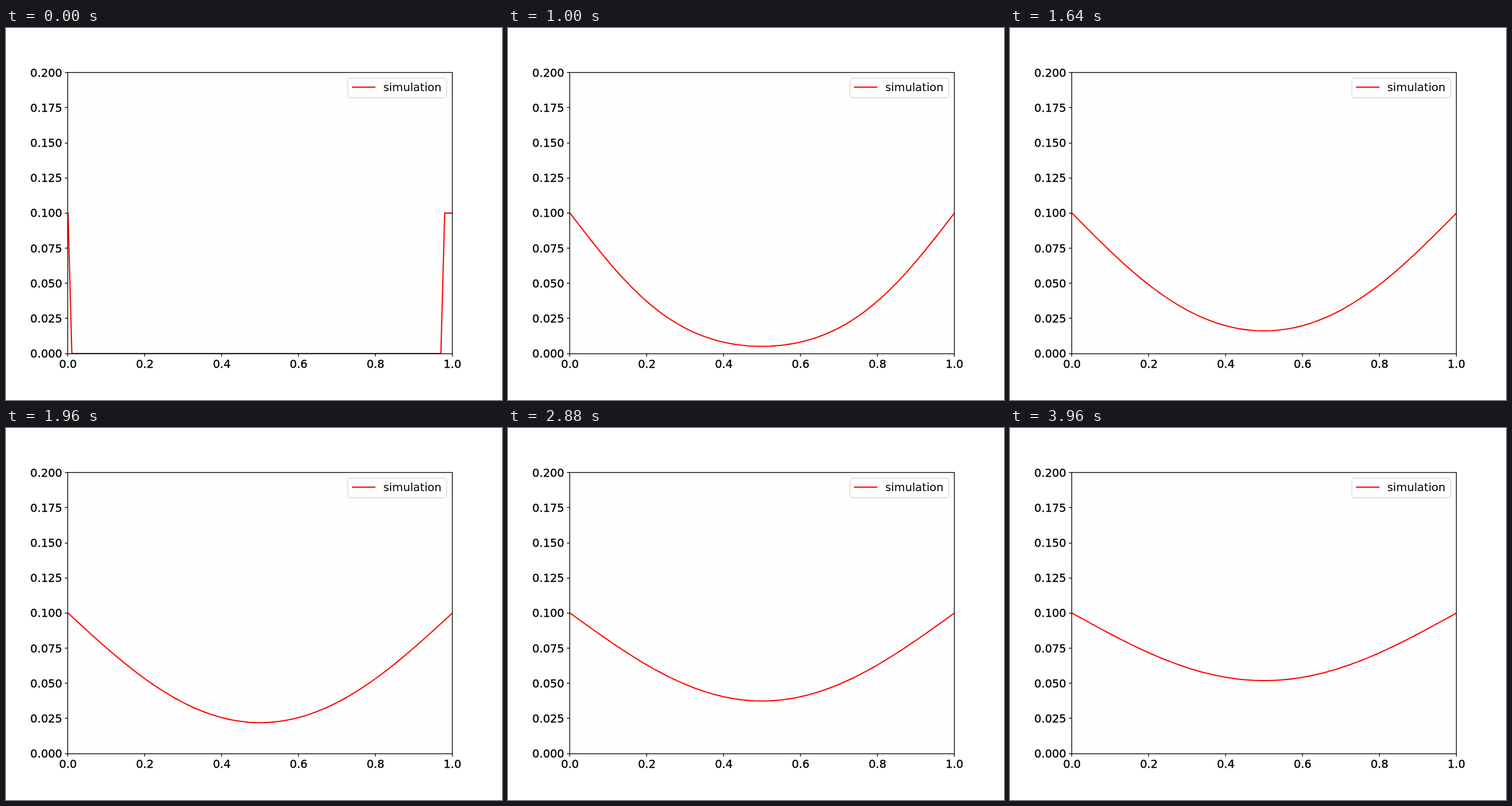
Animation, 864 px wide and 648 px high, one loop 4000 ms. Source, as an HTML page:

```html
<!DOCTYPE html>
<html lang="en">
<head>
<meta charset="utf-8">
<title>Diffusion simulation</title>
<style>
  html, body { margin: 0; width: 100%; height: 100%; overflow: hidden; background: #fff; }
  svg { display: block; width: 864px; height: 648px; }
  text { font: 19.44px "DejaVu Sans", sans-serif; }
  .line { fill: none; stroke: #f00; stroke-width: 2.08; stroke-linejoin: round; stroke-linecap: square; }
  .axis { fill: none; stroke: #000; stroke-width: 1.35; }
  #ticks text { stroke: #000; stroke-width: .35; }
</style>
</head>
<body>
<svg viewBox="0 0 864 648">
  <clipPath id="plot"><rect x="108" y="78" width="670" height="489"/></clipPath>
  <rect x="108" y="78" width="670" height="489" fill="#fefefe"/>
  <path id="curve" class="line" clip-path="url(#plot)"/>
  <rect class="axis" x="107.5" y="77.5" width="670" height="490"/>
  <g id="ticks"></g>
  <rect x="595.5" y="87.5" width="172" height="34" rx="3.9" fill="#fff" stroke="#ccc" stroke-opacity=".8" stroke-width="1.39"/>
  <path class="line" d="M603.7 103H642.6"/>
  <text x="657.2" y="110">simulation</text>
</svg>
<script>
  const LEFT = 108, BOTTOM = 567, WIDTH = 669.6, HEIGHT = 489.24;
  const CELLS = 100, STEPS = 100, STEP_MS = 40;
  const SUBSTEPS = 50, RATE = 0.199;

  const toX = v => LEFT + v * WIDTH;
  const toY = u => BOTTOM - u / 0.2 * HEIGHT;

  // Put one-pixel lines on pixel centres, in line with the frame.
  const snapX = x => Math.ceil(x) - 0.5;
  const snapY = y => Math.floor(y) + 0.5;

  const tick = (path, x, y, anchor, label) =>
    `<path class="axis" d="${path}"/><text x="${x}" y="${y}" text-anchor="${anchor}">${label}</text>`;

  let marks = "";
  for (let i = 0; i <= 5; i++) {
    const x = toX(i / 5);
    marks += tick(`M${snapX(x)} 567.5v4.86`, x, 592, "middle", (i / 5).toFixed(1));
  }
  for (let i = 0; i <= 8; i++) {
    const y = toY(i / 40);
    marks += tick(`M107.5 ${snapY(y)}h-4.86`, 98, Math.round(y + 7), "end", (i / 40).toFixed(3));
  }
  document.getElementById("ticks").innerHTML = marks;

  // Heat equation on the unit interval, both ends held at 0.1.
  function diffuse(u) {
    for (let n = 0; n < SUBSTEPS; n++) {
      const prev = u;
      u = prev.map((v, i) => i === 0 || i === CELLS
        ? v
        : v + RATE * (prev[i - 1] - 2 * v + prev[i + 1]));
    }
    return u;
  }

  const toPath = u => "M" + Array.from(u, (v, i) =>
    `${toX(i / CELLS).toFixed(2)} ${toY(v).toFixed(2)}`).join("L");

  let state = Float64Array.from({ length: CELLS + 1 }, (_, i) => i === 0 || i >= 98 ? 0.1 : 0);
  const paths = [];
  for (let k = 0; k < STEPS; k++) {
    paths.push(toPath(state));
    state = diffuse(state);
  }

  const curve = document.getElementById("curve");
  const start = performance.now();
  function draw(now) {
    const elapsed = Math.max(0, now - start);
    curve.setAttribute("d", paths[Math.floor(elapsed / STEP_MS + 1e-3) % STEPS]);
    requestAnimationFrame(draw);
  }
  draw(start);
</script>
</body>
</html>
```
